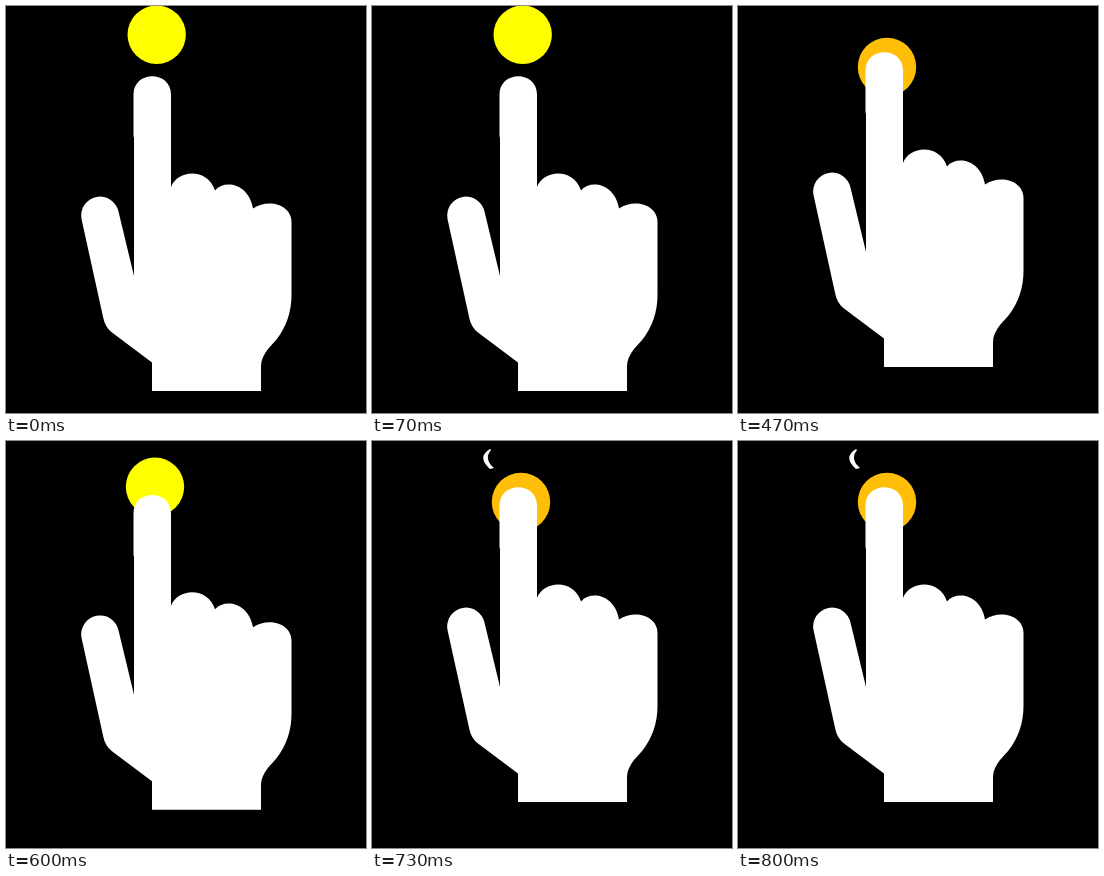
An HTML page that plays this animation: 360 px wide and 407 px high, repeating every 990 ms.

```html
<!DOCTYPE html>
<html lang="en">
<head>
<meta charset="utf-8">
<title>Double tap</title>
<style>
html, body { margin: 0; width: 100%; height: 100%; overflow: hidden; background: #000; }
svg { display: block; width: 360px; height: 407px; }
</style>
</head>
<body>
<svg viewBox="0 0 360 407">
  <circle id="ball" r="29.2"/>
  <path id="hand" fill="#fff" d="M128 270 L112.6 206 A18.5 18.5 0 0 0 75.500 213
    L97.3 312 Q99 321 106 326.5 L146 356.500 V385 H255 V360
    Q255 352 262 343 L270.500 333.500 Q285.500 314 285.500 289 V216
    C285.500 199 263 192 247 202.500 C243 178 219 173 209 184.500
    C202 162 172 163 165 181 V88.500 C165 64 127.500 64 127.500 88.500 V130 L128 132 Z"/>
  <path id="spark" fill="#fff" d="M118 8 Q104.500 16 118 28 L122 27 Q111.500 18 119 9 Z"/>
</svg>
<script>
const LOOP = 990;
const rest = { lift: 0, x: 150.7, y: 28.7, color: '#ff0' };
const touch = { lift: -16.2, x: 149, y: 45.8, color: '#ff0' };
const press = { lift: -24, x: 149, y: 61, color: '#ffbf08' };
// start time in ms and pose held from then on
const steps = [[0, rest], [330, touch], [400, press], [530, rest], [600, touch], [670, press]];
const [ball, hand, spark] = ['ball', 'hand', 'spark'].map(id => document.getElementById(id));

function draw(now) {
  const t = now % LOOP;
  const pose = steps.filter(([start]) => start <= t).pop()[1];
  ball.setAttribute('cx', pose.x);
  ball.setAttribute('cy', pose.y);
  ball.setAttribute('fill', pose.color);
  hand.setAttribute('transform', `translate(0 ${pose.lift})`);
  spark.setAttribute('visibility', t >= 730 ? 'visible' : 'hidden');
}

let begin;
function tick(now) {
  begin ??= now;
  draw(now - begin);
  requestAnimationFrame(tick);
}
draw(0);
requestAnimationFrame(tick);
</script>
</body>
</html>
```
